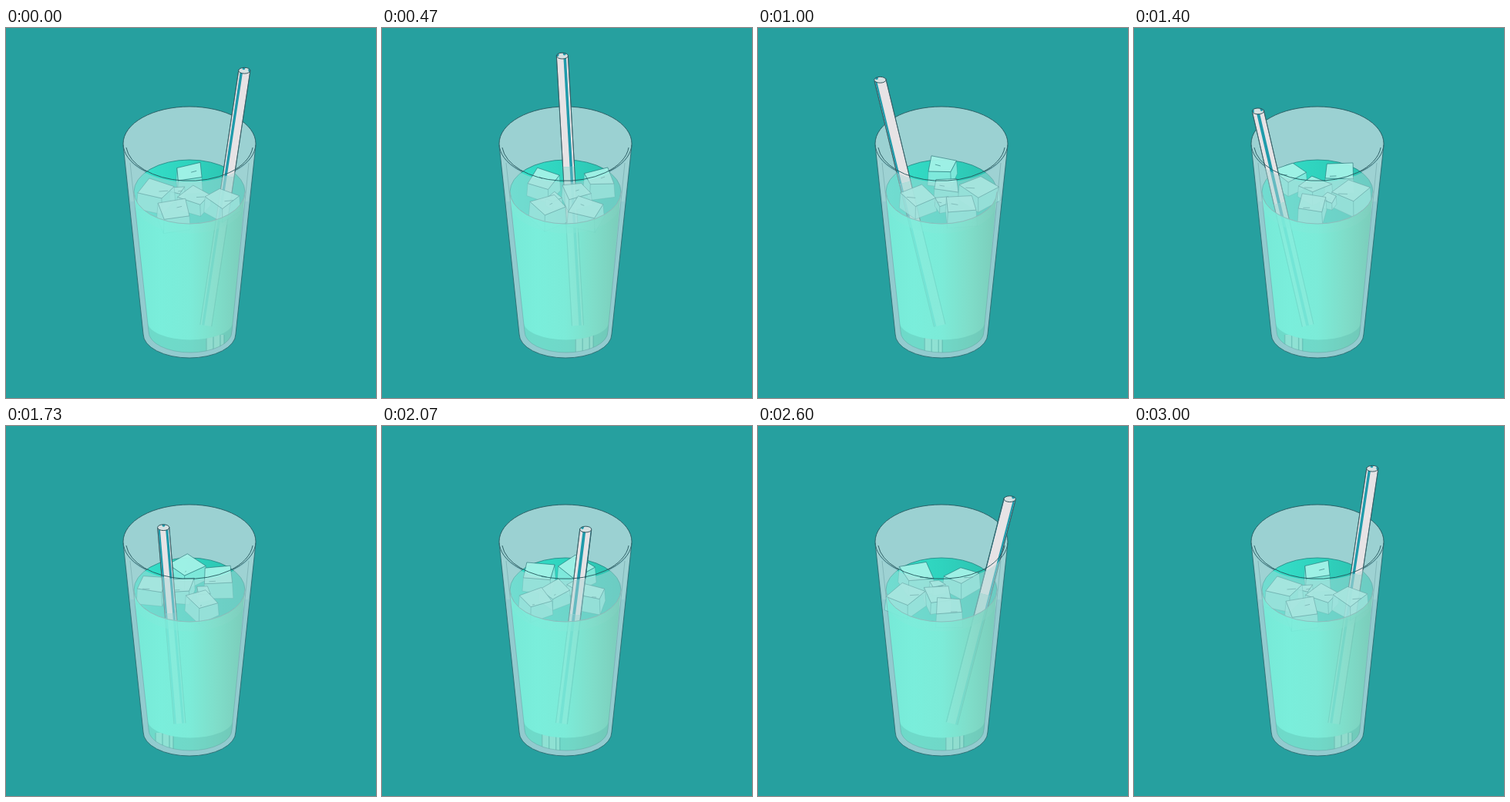
An HTML page with a canvas that plays this animation: 480 by 480 pixels, repeating every 3.07 s.

```html
<!DOCTYPE html>
<html lang="en">
<head>
<meta charset="utf-8">
<title>Iced drink</title>
<style>
html, body { margin: 0; width: 100%; height: 100%; overflow: hidden; background: #26a09f; }
canvas { display: block; }
</style>
</head>
<body>
<canvas id="stage" width="480" height="480"></canvas>
<script>
const c = document.getElementById('stage').getContext('2d');
const LOOP = 3070, STEP_MS = 200 / 3, LAST = 45, FLAT = 0.58, RISE = 0.81;
const rad = d => d * Math.PI / 180;
const cos = d => Math.cos(rad(d)), sin = d => Math.sin(rad(d));
const mix = (a, b, k) => a + (b - a) * k;

// Start angle, distance, corner radius, height above water, start yaw, seed, drop
const ICE = [
  [90, 35, 25, 7, 45, 1, 0],
  [184, 43, 28, 6, 22, 5, 0],
  [247, 47, 28, 6, 50, 9, 0],
  [-31, 49, 23, 8, 12, 14, 0],
  [-60, 12, 22, 6, 15, 20, 2],
  [155, 18, 11, 6, 30, 27, 6]
];
const STRIPES = [-30, 100, -172];

function fill(path, color) { c.fillStyle = color; c.fill(path); }
function line(path, color, width = 0.9) {
  c.strokeStyle = color;
  c.lineWidth = width;
  c.stroke(path);
}
function ellipse(x, y, rx, ry, from = 0, to = 360) {
  const p = new Path2D();
  p.ellipse(x, y, rx, ry, 0, rad(from), rad(to));
  return p;
}
function poly(points) {
  const p = new Path2D();
  points.forEach(([x, y]) => p.lineTo(x, y));
  p.closePath();
  return p;
}
function gradient(x0, x1, ...stops) {
  const g = c.createLinearGradient(x0, 0, x1, 0);
  stops.forEach((s, i) => g.addColorStop(i / (stops.length - 1), s));
  return g;
}
function clipped(path, draw) {
  c.save();
  c.clip(path);
  draw();
  c.restore();
}

const rim = ellipse(238, 150, 86, 48);
const frontRim = ellipse(238, 150, 82.5, 48.3, 6, 174);
const wall = new Path2D('M152 152L178 397A60 31 0 0 0 298 397L324 152');
const inner = new Path2D('M161 175L185 394A54 27 0 0 0 293 394L315 175');
const surface = ellipse(238, 212.5, 72, 41.5);
const drink = new Path2D('M166 212A72 41.5 0 0 0 310 212L293 394A54 27 0 0 1 185 394Z');
const base = new Path2D('M184 382A54 22 0 0 0 294 382L293 394A54 27 0 0 1 185 394Z');
const glassFront = new Path2D('M152 152A86 48 0 0 0 324 152L314 225H310A72 41.5 0 0 1 166 225H162Z');
const drinkColor = gradient(166, 310, '#77e9d7', '#7aeedb', '#7cebd8', '#7fddc9', '#7bccba');
const waterColor = gradient(166, 310, '#36e0ca', '#2fd3be', '#2dbfae');

function iceBlock(turn, [start, dist, size, top, yaw, seed, drop]) {
  const a = start + turn;
  const x0 = 238 + dist * cos(a), y0 = 213 + drop - dist * FLAT * sin(a);
  const noise = n => { const v = Math.sin(seed * 12.9 + n * 78.2) * 43758.5; return v - Math.floor(v); };
  const upper = [], lower = [];
  for (let k = 0; k < 4; k++) {
    const angle = yaw + turn + 90 * k + (noise(k) - 0.5) * 26;
    const r = size * (0.84 + 0.26 * noise(k + 4));
    const z = top * (0.6 + 0.8 * noise(k + 8));
    const px = r * cos(angle), py = -r * FLAT * sin(angle);
    upper.push([x0 + px * 0.94, y0 + py * 0.94 - z * RISE]);
    lower.push([x0 + px, y0 + py + size * 0.6 * RISE]);
  }
  const draw = () => {
    for (let k = 0; k < 4; k++) {
      const n = (k + 1) % 4;
      if (upper[k][0] > upper[n][0]) continue;
      const side = poly([upper[k], upper[n], lower[n], lower[k]]);
      fill(side, 'rgba(146,238,226,.8)');
      line(side, 'rgba(35,125,125,.45)', 0.7);
    }
    const lid = poly(upper);
    fill(lid, 'rgba(166,243,233,.92)');
    line(lid, 'rgba(30,100,105,.7)', 0.8);
    // Short crack on the top face
    c.beginPath();
    c.moveTo(mix(upper[0][0], x0, 0.35), mix(upper[0][1], y0, 0.6));
    c.lineTo(mix(upper[0][0], x0, 0.85), mix(upper[0][1], y0, 0.7));
    c.stroke();
  };
  return { y: y0, draw };
}

function straw(turn, phi) {
  const tx = 240 + 88 * cos(phi), ty = 86 - 50 * sin(phi);
  const bx = 242 + 17.5 * cos(phi - 47), by = 386;
  const waterY = 213 - 33 * sin(phi);
  const len = Math.hypot(bx - tx, by - ty);
  const at = (u, y) => {
    const k = (y - ty) / (by - ty);
    return [mix(tx, bx, k) + 7.5 * u * (by - ty) / len, y - 7.5 * u * (bx - tx) / len];
  };
  const band = (u0, u1, y0, y1) => poly([at(u0, y0), at(u1, y0), at(u1, y1), at(u0, y1)]);
  const piece = (y0, y1, alpha) => {
    c.globalAlpha = alpha;
    fill(band(-1, 1, y0, y1), '#e7e3e5');
    for (const s of STRIPES) {
      const a = s + turn;
      if (cos(a) > 0.1) fill(band(sin(a - 15), sin(a + 15), y0, y1), '#1f9bab');
    }
    for (const u of [-1, 1]) line(band(u, u, y0, y1), '#315b62', 0.8);
    c.globalAlpha = 1;
  };
  const draw = () => {
    piece(waterY, by, 0.75);
    piece(ty, waterY, 1);
    const tip = ellipse(tx, ty, 7.6, 3.9);
    fill(tip, '#d5e1e2');
    clipped(tip, () => {
      for (const s of STRIPES) {
        const a = s + turn;
        if (cos(a) < 0) fill(ellipse(tx + 7 * sin(a), ty + 3.5 * cos(a), 2, 2.6), '#1f9bab');
      }
    });
    line(tip, '#23474e');
  };
  return { y: waterY + 3, draw };
}

function baseGlint(phi) {
  const x = 238 + 34 * cos(phi - 50);
  c.fillStyle = 'rgba(190,235,225,.4)';
  c.fillRect(x - 12, 398, 24, 26);
  c.fillStyle = 'rgba(75,165,158,.45)';
  for (const d of [-12, -3, 6, 11]) c.fillRect(x + d, 398, 1.4, 26);
}

function render(step) {
  const turn = 8 * step, phi = 38 + turn;
  c.fillStyle = '#26a09f';
  c.fillRect(0, 0, 480, 480);
  fill(wall, '#92cbcf');
  fill(rim, '#9bd1d2');
  line(rim, '#28595f');
  fill(drink, drinkColor);
  fill(surface, waterColor);
  line(surface, '#23827f', 0.8);

  ICE.map(block => iceBlock(turn, block))
    .concat(straw(turn, phi))
    .sort((a, b) => a.y - b.y)
    .forEach(part => part.draw());

  clipped(glassFront, () => {
    c.fillStyle = 'rgba(172,217,215,.5)';
    c.fillRect(140, 140, 200, 130);
  });
  c.globalAlpha = 0.86;
  fill(drink, drinkColor);
  c.globalAlpha = 1;
  clipped(base, () => {
    c.fillStyle = 'rgba(90,180,170,.35)';
    c.fillRect(170, 370, 140, 60);
    baseGlint(phi);
  });
  line(ellipse(238, 212.5, 72, 41.5, 0, 180), '#8fb9ba');
  line(inner, 'rgba(100,150,155,.55)', 0.8);
  line(wall, '#2c6a70');
  line(frontRim, '#24555c');
}

c.lineJoin = 'round';

// Steps start on whole hundredths of a second, so a few ms of slack apply.
function tick(now) {
  render(Math.min(LAST, Math.floor((now % LOOP + 4) / STEP_MS)));
  requestAnimationFrame(tick);
}
requestAnimationFrame(tick);
</script>
</body>
</html>
```
